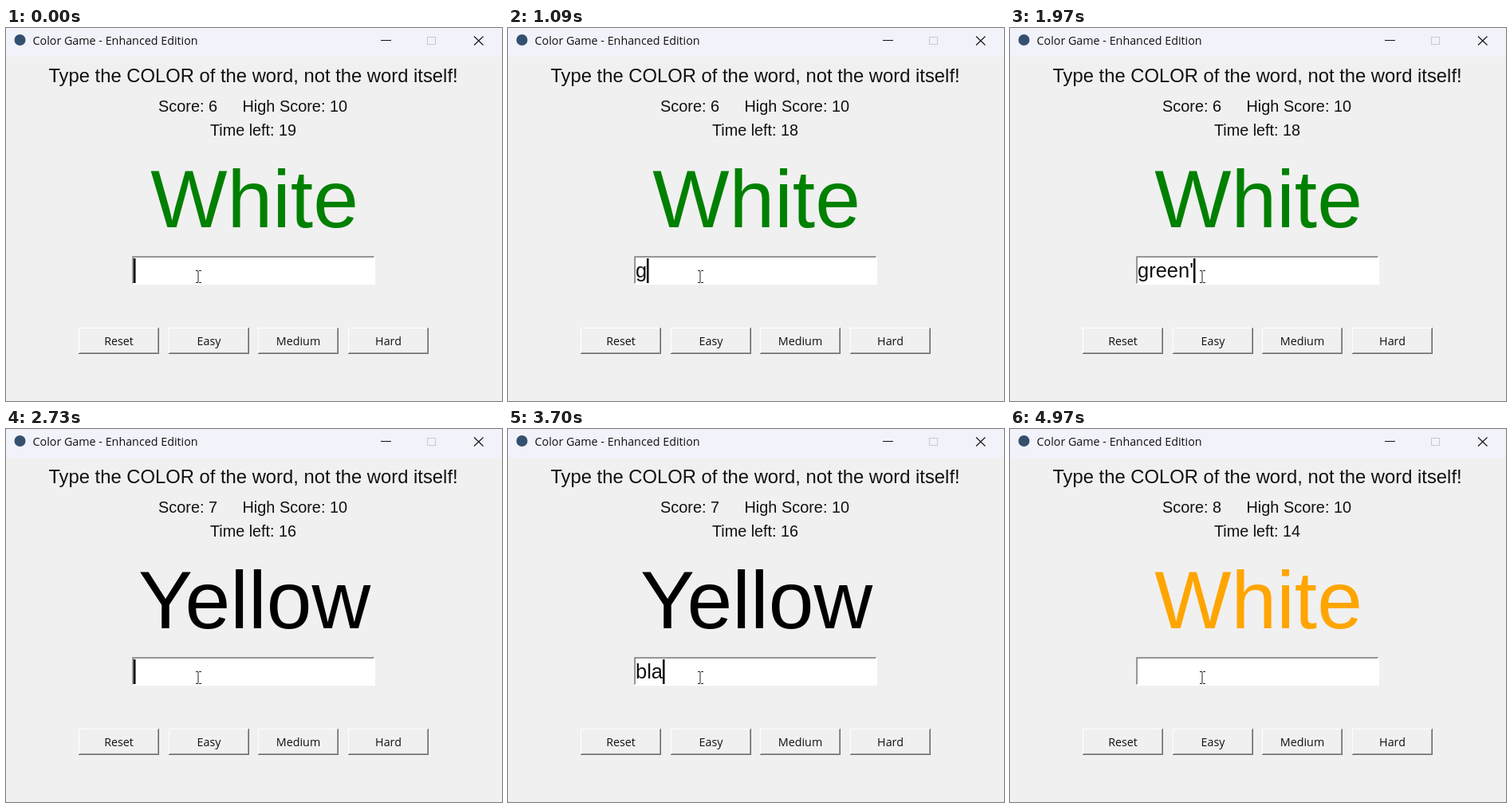
Write an HTML page with a canvas that moves like this. It is 622 px wide and 468 px high and loops after 5000 ms.

```html
<!DOCTYPE html>
<html lang="en">
<head>
<meta charset="utf-8">
<title>Color Game</title>
<style>
  html, body { margin: 0; width: 100%; height: 100%; overflow: hidden; background: #f0f0f0; }
  canvas { display: block; }
</style>
</head>
<body>
<canvas id="stage" width="622" height="468"></canvas>
<script>
const LOOP = 5000;
const ctx = document.getElementById('stage').getContext('2d');
const SANS = '"Liberation Sans", Arial, sans-serif';
const UI = '"Open Sans", "Noto Sans", sans-serif';

// Each track lists [start in ms, value]
const timer = [[0, 19], [990, 18], [1985, 17], [2715, 16], [3710, 15], [4690, 14]];
const typed = [
  [0, ''], [1000, 'g'], [1180, 'gr'], [1370, 'gre'], [1540, 'gree'], [1720, 'green'],
  [1900, "green'"], [2150, 'green'], [2450, ''],
  [3220, 'b'], [3440, 'bl'], [3600, 'bla'], [3830, 'blac'], [3990, 'black'], [4250, '']
];
const rounds = [
  [0, { score: 6, word: 'White', color: '#008000' }],
  [2450, { score: 7, word: 'Yellow', color: '#000' }],
  [4250, { score: 8, word: 'White', color: '#ffa500' }]
];
const at = (track, t) => track.findLast(step => step[0] <= t)[1];

// The caret blinks independently of typing
const BLINK = 878.5, BLINK_OFF = 299.5, BLINK_START = 4091;
const caretOn = t => (t - BLINK_START + 5 * BLINK) % BLINK >= BLINK_OFF;

function rect(x, y, w, h, color) {
  ctx.fillStyle = color;
  ctx.fillRect(x, y, w, h);
}

function text(str, x, y, size, { font = SANS, align = 'center', color = '#111' } = {}) {
  ctx.font = `${size}px ${font}`;
  ctx.textAlign = align;
  ctx.fillStyle = color;
  ctx.fillText(str, x, y);
}

function line(points, color) {
  ctx.strokeStyle = color;
  ctx.lineWidth = 1.1;
  ctx.beginPath();
  for (const [x1, y1, x2, y2] of points) {
    ctx.moveTo(x1, y1);
    ctx.lineTo(x2, y2);
  }
  ctx.stroke();
}

function titleBar() {
  rect(0, 0, 622, 36, '#f2f2fb');
  ctx.fillStyle = '#34506f';
  ctx.beginPath();
  ctx.arc(17.5, 15, 7, 0, 7);
  ctx.fill();
  text('Color Game - Enhanced Edition', 33.5, 21, 14.3, { font: UI, align: 'left' });
  rect(470, 15, 13, 1, '#111');
  ctx.strokeStyle = '#c8c8d0';
  ctx.lineWidth = 1;
  ctx.strokeRect(528.5, 11.5, 10, 9);
  line([[587, 10.5, 598.5, 21.5], [598.5, 10.5, 587, 21.5]], '#111');
}

function button(label, x) {
  const y = 376, w = 101, h = 33;
  rect(x, y, w, h, '#696969');
  rect(x, y, w - 1, h - 1, '#fff');
  rect(x + 1, y + 1, w - 2, h - 2, '#a0a0a0');
  rect(x + 1, y + 1, w - 3, h - 3, '#f0f0f0');
  text(label, x + w / 2, 398, 14.3, { font: UI });
}

function entry(value, caret) {
  rect(158, 286, 305, 36, '#fff');
  rect(158, 286, 304, 1, '#a0a0a0');
  rect(158, 286, 1, 35, '#a0a0a0');
  rect(159, 287, 302, 1, '#8a8a8a');
  rect(159, 287, 1, 33, '#8a8a8a');
  text(value, 160, 313, 25.5, { align: 'left' });
  if (caret) {
    rect(Math.round(159.5 + ctx.measureText(value).width), 289, 2.5, 31, '#000');
  }
}

function pointer() {
  rect(240.5, 305, 1, 14, '#222');
  for (const y of [304, 319]) {
    rect(238, y, 3, 1, '#222');
    rect(242, y, 3, 1, '#222');
  }
}

function draw(t) {
  const { score, word, color } = at(rounds, t);
  rect(0, 0, 622, 468, '#f0f0f0');
  titleBar();
  text('Type the COLOR of the word, not the word itself!', 310, 68, 23.8);
  text(`Score: ${score}`, 191, 105, 19.9, { align: 'left' });
  text('High Score: 10', 296.5, 105, 19.9, { align: 'left' });
  text(`Time left: ${at(timer, t)}`, 310, 135, 19.8);
  text(word, 311.5, 250, 102, { color });
  entry(at(typed, t), caretOn(t));
  pointer();
  ['Reset', 'Easy', 'Medium', 'Hard'].forEach((label, i) => button(label, Math.round(91 + i * 112.6)));
}

function frame() {
  draw(performance.now() % LOOP);
  requestAnimationFrame(frame);
}
frame();
</script>
</body>
</html>
```
